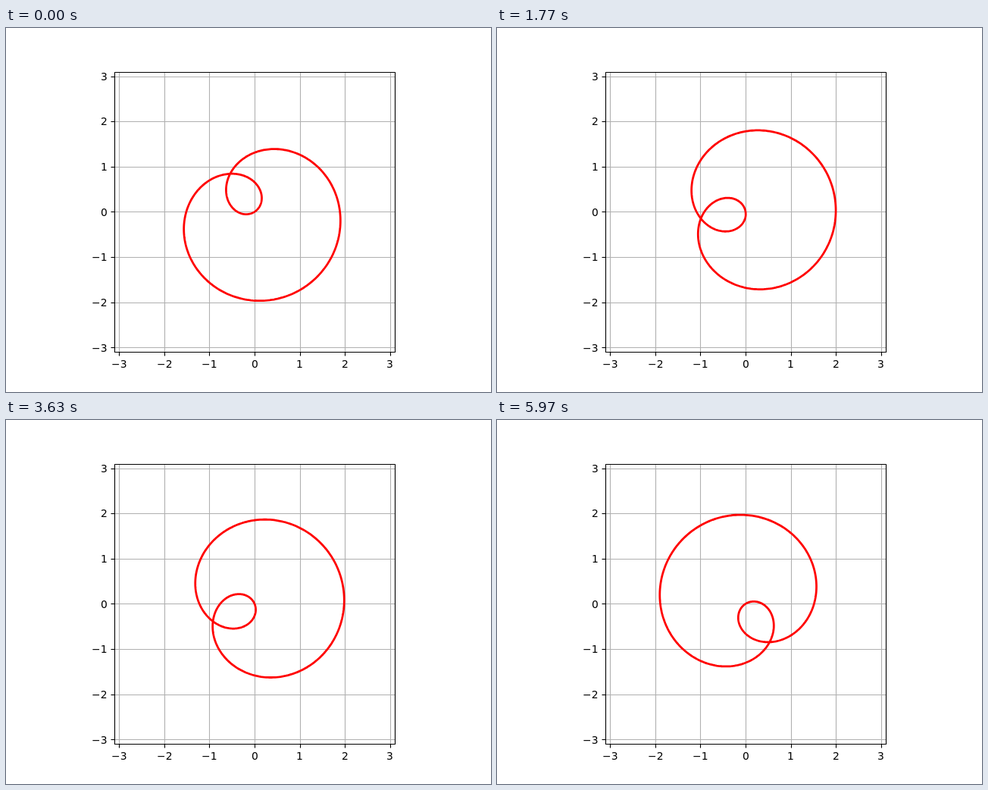
Recreate the animation shown at these times as an HTML page with a canvas. Size 640 by 480 pixels, loop 6000 ms.

```html
<!DOCTYPE html>
<html lang="en">
<head>
<meta charset="utf-8">
<title>Rotating curve</title>
<style>
  html, body { margin: 0; width: 100%; height: 100%; overflow: hidden; background: #fff; }
  canvas { display: block; }
</style>
</head>
<body>
<canvas id="stage" width="640" height="480"></canvas>
<script>
const ctx = document.getElementById('stage').getContext('2d');

const CX = 328, CY = 242.4, HALF = 184.8, UNIT = HALF / 3.1;
const LEFT = CX - HALF, RIGHT = CX + HALF, TOP = CY - HALF, BOTTOM = CY + HALF;
const TICKS = [-3, -2, -1, 0, 1, 2, 3];
const THIN = 0.8 * 100 / 72, THICK = 2 * 100 / 72, TICK_LEN = 5;
const STEP_MS = 30, STEPS = 200, START = -1, TURN = -0.3;

const px = x => CX + x * UNIT;
const py = y => CY - y * UNIT;
const snap = v => Math.floor(v + 0.5) + 0.5;
const label = v => (v < 0 ? '\u2212' : '') + Math.abs(v);

function line(x1, y1, x2, y2, color) {
  ctx.strokeStyle = color;
  ctx.lineWidth = THIN;
  ctx.beginPath();
  ctx.moveTo(x1, y1);
  ctx.lineTo(x2, y2);
  ctx.stroke();
}

function drawGrid() {
  for (const v of TICKS) {
    const x = snap(px(v)), y = snap(py(v));
    line(x, snap(TOP), x, snap(BOTTOM), '#b0b0b0');
    line(snap(LEFT), y, snap(RIGHT), y, '#b0b0b0');
  }
}

function drawAxes() {
  const l = snap(LEFT), r = snap(RIGHT), t = snap(TOP), b = snap(BOTTOM);
  ctx.strokeStyle = '#000';
  ctx.lineWidth = THIN;
  ctx.strokeRect(l, t, r - l, b - t);

  ctx.fillStyle = '#000';
  ctx.font = '13.89px "DejaVu Sans", sans-serif';
  ctx.textAlign = 'left';
  ctx.textBaseline = 'alphabetic';
  for (const v of TICKS) {
    const x = snap(px(v)), y = snap(py(v)), text = label(v);
    const w = ctx.measureText(text).width;
    line(x, b, x, b + TICK_LEN, '#000');
    line(l, y, l - TICK_LEN, y, '#000');
    ctx.fillText(text, Math.round(px(v) - w / 2), 448);
    ctx.fillText(text, Math.round(LEFT - 9.72 - w), Math.round(py(v) + 5.28));
  }
}

// Sum of two unit circles, the second turning twice as fast, rotated as a whole.
function drawCurve(angle) {
  const n = 400;
  ctx.strokeStyle = '#f00';
  ctx.lineWidth = THICK;
  ctx.lineJoin = 'round';
  ctx.beginPath();
  for (let i = 0; i < n; i++) {
    const a = 2 * Math.PI * i / n;
    ctx.lineTo(px(Math.cos(a + angle) + Math.cos(2 * a + angle)),
               py(Math.sin(a + angle) + Math.sin(2 * a + angle)));
  }
  ctx.closePath();
  ctx.stroke();
}

function draw(ms) {
  const step = Math.floor(ms / STEP_MS) % STEPS;
  ctx.fillStyle = '#fff';
  ctx.fillRect(0, 0, 640, 480);
  drawGrid();
  drawCurve(START + TURN * step);
  drawAxes();
}

const begin = performance.now();
function tick() {
  draw(performance.now() - begin);
  requestAnimationFrame(tick);
}
draw(0);
requestAnimationFrame(tick);
</script>
</body>
</html>
```
